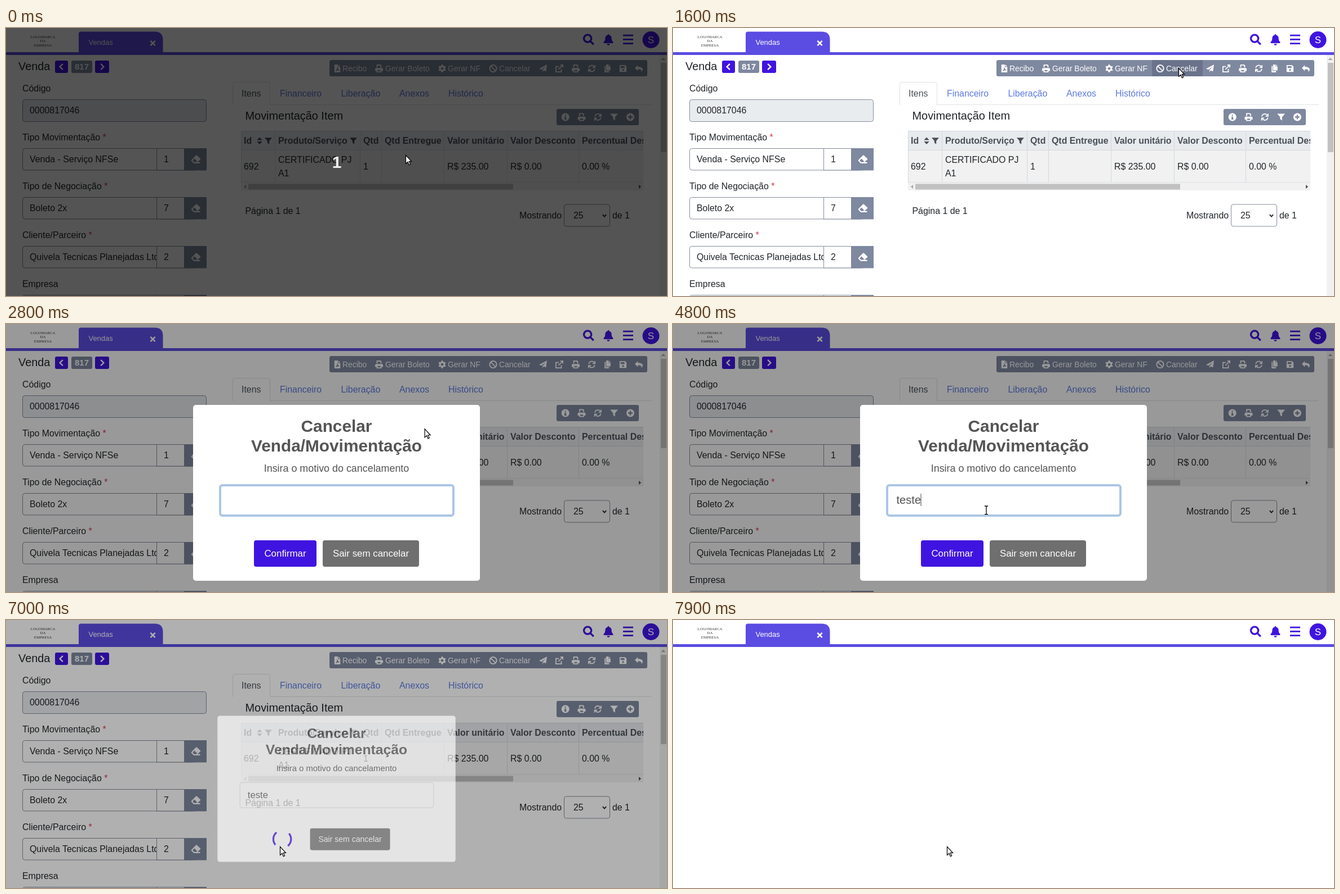
Write an HTML page that moves like this. It is 1173 by 477 pixels and loops after 8 s.

```html
<!DOCTYPE html>
<html lang="pt-BR">
<head>
<meta charset="utf-8">
<title>Vendas</title>
<style>
html, body { margin: 0; height: 100%; overflow: hidden; background: #fff; }
svg { display: block; }
text { font-family: "Liberation Sans", Arial, sans-serif; white-space: pre; }
</style>
</head>
<body>
<svg id="stage" width="1173" height="477" viewBox="0 0 1173 477"></svg>
<script>
const INK = '#212529', PURPLE = '#4014e0', VIOLET = '#5b4ce2', SLATE = '#7e889f', LINE = '#dee2e6';

const ring = 'M8 0a8 8 0 1 0 .01 0Z';
const gear = 'M' + Array.from({length: 24}, (_, i) => {
  const a = (i - .5) * Math.PI / 12, r = i % 4 < 2 ? 8 : 5.9;
  return (8 + r * Math.sin(a)).toFixed(2) + ' ' + (8 - r * Math.cos(a)).toFixed(2);
}).join('L') + 'ZM8 5.3a2.7 2.7 0 1 0 .01 0Z';

// Icons on a 16-unit grid: [path, stroke width (filled when absent)]
const ICONS = {
  print: ['M3 0H11L13 2V6H3ZM5 2V6H11V3H10V2ZM2 7H14Q16 7 16 9V13H13V16H3V13H0V9Q0 7 2 7ZM5 11V14H11V11Z'],
  pdf: ['M2 0H9V5H14V16H2ZM10 0L14 4H10ZM4.5 13Q8.5 9 7 6H8.2Q8.5 9 12 11.2L11.3 12.2Q8 10.7 5.6 13.6Z'],
  cog: [gear],
  ban: ['M8 1a7 7 0 1 0 .01 0M3 3L13 13', 2],
  plane: ['M16 0L14 14L9 12L7 16V11.5L13 4L5 10.5L0 8.5Z'],
  open: ['M12 9V15H1V4H7M10 1H15V6M15 1L6 10', 2],
  sync: ['M2 7A6 6 0 0 1 13 4.5M14 9A6 6 0 0 1 3 11.5M14.5 1V6H9.5M1.5 15V10H6.5', 2],
  copy: ['M5 0H10V4H14V12H5ZM11 0L14 3H11ZM2 3H4V13H11V16H2Z'],
  save: ['M1 1H12L15 4V15H1ZM3 3V7H11V3ZM8 9a2 2 0 1 0 .01 0Z'],
  reply: ['M0 7L6 1V4.5Q16 5 16 10Q16 13 13 15Q15 9.5 6 9.5V13Z'],
  info: [ring + 'M6.7 3H9.3V5.5H6.7ZM6 7H9.5V11.5H10.3V13H5.7V11.5H6.5V8.3H6Z'],
  plus: [ring + 'M6.7 3.5H9.3V6.7H12.5V9.3H9.3V12.5H6.7V9.3H3.5V6.7H6.7Z'],
  filter: ['M0 1H16L10 8V15L6 12V8Z'],
  sort: ['M3 7L8 1.5L13 7ZM3 9.5H13L8 15Z'],
  eraser: ['M9.5 1.5L15.5 7Q16 7.8 15.5 8.4L10.5 13H15V15H4.5L.5 11Q0 10 .5 9.3L8 1.7Q8.7 1 9.5 1.5ZM5.5 7L10 11.5L8.5 13H5L2.5 10.3Z'],
  times: ['M2 2L14 14M14 2L2 14', 4],
  search: ['M6.5 1.3a5.2 5.2 0 1 0 .01 0M10.5 10.5L15 15', 2.6],
  bell: ['M8 0Q9 0 9 1.3Q12.5 2 12.5 6Q12.5 9.5 14.5 11Q15.3 13 14 13H2Q.7 13 1.5 11Q3.5 9.5 3.5 6Q3.5 2 7 1.3Q7 0 8 0ZM6 14H10Q10 16 8 16Q6 16 6 14Z'],
  bars: ['M.8 2.4H15.2M.8 8.2H15.2M.8 14H15.2', 2.2],
  left: ['M10.5 2.5L5 8L10.5 13.5', 2.6],
  right: ['M5.5 2.5L11 8L5.5 13.5', 2.6],
  down: ['M3 5L8 10.5L13 5', 3],
};

const text = (x, y, s, size = 15.9, fill = INK, more = '') =>
  `<text x="${x}" y="${y}" font-size="${size}" fill="${fill}" ${more}>${s}</text>`;
const bold = (x, y, s, size, fill, more = '') => text(x, y, s, size, fill, 'font-weight="bold" ' + more);
const mid = 'text-anchor="middle"';
const rect = (x, y, x2, y2, fill, r = 0, more = '') =>
  `<rect x="${x}" y="${y}" width="${x2 - x}" height="${y2 - y}" rx="${r}" fill="${fill}" ${more}/>`;
const path = (d, fill, more = '') => `<path d="${d}" fill="${fill}" ${more}/>`;
const icon = (name, x, y, size = 14, color = '#fff') => {
  const [d, w] = ICONS[name], k = size / 16;
  const paint = w ? `stroke="${color}" stroke-width="${w}"` : 'fill-rule="evenodd"';
  return path(d, w ? 'none' : color, `${paint} transform="translate(${x - size / 2} ${y - size / 2}) scale(${k})"`);
};
const clip = (x, y, x2, y2, body) =>
  `<svg x="${x}" y="${y}" width="${x2 - x}" height="${y2 - y}" viewBox="${x} ${y} ${x2 - x} ${y2 - y}">${body}</svg>`;

const header = () =>
  ['LOGOMARCA', 'DA', 'EMPRESA'].map((s, i) =>
    text(65.5, 17.5 + i * 7.8, s, 6.8, '#333', mid + ' style="font-family:\'Liberation Serif\',serif"')).join('') +
  path('M129 44V10Q129 6.500 133 6.500H264Q278.500 6.500 278.500 21V44Z', VIOLET) +
  rect(0, 43, 1173, 48, VIOLET) +
  text(146.5, 30, 'Vendas', 12.95, '#fff') + icon('times', 260.5, 27, 11) +
  icon('search', 1034, 20.5, 20, PURPLE) + icon('bell', 1069, 20.8, 20, PURPLE) +
  icon('bars', 1104, 20, 20, PURPLE) +
  `<circle cx="1144.500" cy="21" r="15" fill="${PURPLE}"/>` + text(1144.5, 26.5, 'S', 17, '#fff', mid);

const border = 'stroke="#858d9c"';
const field = (y, label, value, code) =>
  text(29, y - 14, label + ' <tspan fill="#dc3545">*</tspan>') +
  rect(29.5, y + .5, 340, y + 39, '#fff', 4, border) +
  rect(267.5, y + .5, 330, y + 39, '#fff', 0, border) +
  path(`M316 ${y}H356V${y + 39.5}H316Z`, SLATE) +
  clip(30, y, 267, y + 39, text(42, y + 25, value)) +
  text(280, y + 25, code) + icon('eraser', 337, y + 19.5, 17);

const form = () =>
  text(22, 75, 'Venda', 19.9) +
  rect(87, 58, 110, 80, PURPLE, 3) + icon('left', 98.5, 69, 15) +
  rect(116, 58, 153, 80, SLATE, 3) + bold(134.5, 74, '817', 14.9, '#fff', mid) +
  rect(158, 58, 183, 80, PURPLE, 3) + icon('right', 170.5, 69, 15) +
  text(29, 113, 'Código') + rect(29.5, 127.5, 355.5, 166.5, '#e9ecef', 4, border) + text(42, 152, '0000817046') +
  field(214, 'Tipo Movimentação', 'Venda - Serviço NFSe', 1) +
  field(301, 'Tipo de Negociação', 'Boleto 2x', 7) +
  field(388, 'Cliente/Parceiro', 'Quivela Tecnicas Planejadas Ltda', 2) +
  field(475, '', '', '').replace(/<text.*?<\/text>/, '') + text(29, 461, 'Empresa');

const toolbar = () =>
  rect(574, 57, 1138, 86, SLATE, 3) + rect(850, 57, 940, 86, '#6a738b', 0, 'id="hover"') +
  [['pdf', 588, 'Recibo', 597], ['print', 662, 'Gerar Boleto', 673], ['cog', 774, 'Gerar NF', 784],
   ['ban', 864.5, 'Cancelar', 875], ['plane', 953], ['open', 982], ['print', 1011], ['sync', 1039.5],
   ['copy', 1067.5], ['save', 1095], ['reply', 1123]]
    .map(([n, x, s, tx]) => icon(n, x, 72) + (s ? text(tx, 77, s, 13.9, '#fff') : '')).join('') +
  rect(977, 144, 1123, 173, SLATE, 3) +
  ['info', 'print', 'sync', 'filter', 'plus'].map((n, i) => icon(n, 992.7 + i * 28.8, 158.5)).join('');

const table = () => clip(417, 183, 1131, 289,
  rect(417, 184, 1131, 218, '#e7ebee') + rect(417, 218, 1131, 275, '#f1f1f1') +
  path('M417 183.500H1131M417 217.500H1131M417 275H1131M417.500 184V275' +
    [478, 629, 667, 778, 890, 1017].map(x => `M${x - .5} 184V275`).join(''), 'none', 'stroke="#d3d8dd"') +
  [['Id', 422], ['Produto/Serviço', 483], ['Qtd', 634], ['Qtd Entregue', 672], ['Valor unitário', 783],
   ['Valor Desconto', 895], ['Percentual Desconto', 1022]]
    .map(([s, x]) => bold(x, 206, s, 15.9, '#495057')).join('') +
  icon('sort', 450, 200.5, 15, '#495057') + icon('filter', 465.5, 201, 13, '#495057') +
  icon('filter', 616.5, 201, 13, '#495057') +
  [['692', 422], ['1', 634], ['R$ 235.00', 783], ['R$ 0.00', 895], ['0.00 %', 1022]]
    .map(([s, x]) => text(x, 252, s)).join('') +
  text(483, 240, 'CERTIFICADO PJ') + text(483, 263.5, 'A1') +
  rect(417, 276, 1131, 289, '#f1f1f1') + rect(430, 277.5, 900, 287.5, '#c1c1c1') +
  path('M426 279V286L422 282.500Z', '#a3a3a3') + path('M1123 279V286L1127 282.500Z', '#505050'));

const panel = () =>
  path('M402 136.500H1146', 'none', `stroke="${LINE}"`) +
  path('M402.500 137V100Q402.500 96.500 406 96.500H465Q468.500 96.500 468.500 100V137', '#fff', `stroke="${LINE}"`) +
  text(418, 122, 'Itens', 15.9, '#495057') +
  [['Financeiro', 486], ['Liberação', 594.5], ['Anexos', 698], ['Histórico', 785]]
    .map(([s, x]) => text(x, 122, s, 15.9, '#5b7ae0')).join('') +
  text(424.5, 163, 'Movimentação Item', 19.9) +
  text(424.5, 331, 'Página 1 de 1') + text(911, 339, 'Mostrando') +
  rect(990.5, 314, 1071.5, 353, '#fff', 4, border) + text(1007, 339, '25') +
  icon('down', 1062, 334, 10) .replace('#fff', INK) + text(1076, 339, 'de 1') +
  rect(1160, 48, 1173, 477, '#f1f1f1') + rect(1162, 62, 1172, 221, '#c1c1c1') +
  path('M1162.500 57L1166.500 53L1170.500 57Z', '#a3a3a3');

const modal = () =>
  rect(332, 144, 841, 457, '#fff', 5) +
  bold(586.5, 191.5, 'Cancelar', 29.8, '#555', mid) +
  bold(586.5, 227, 'Venda/Movimentação', 29.8, '#555', mid) +
  text(586.5, 262.5, 'Insira o motivo do cancelamento', 17.9, '#545454', mid) +
  rect(380, 287, 794, 341, '#fff', 4, 'id="box"') +
  text(396.5, 320, '', 20.1, '#545454', 'id="typed"') +
  rect(0, 302, 1, 324, '#444', 0, 'id="caret"') +
  `<g id="confirm">${rect(440, 385, 551, 432, PURPLE, 4, 'id="confirmBg"')}${text(495.5, 414, 'Confirmar', 16.9, '#fff', mid)}</g>` +
  path('M-13.4 -13.4A19 19 0 0 0 -13.4 13.4M13.4 -13.4A19 19 0 0 1 13.4 13.4', 'none',
    `id="spinner" stroke="${PURPLE}" stroke-width="4"`) +
  `<g id="leave">${rect(562, 385, 733, 432, '#6f6f6f', 4)}${text(647.5, 414, 'Sair sem cancelar', 16.9, '#fff', mid)}</g>`;

document.getElementById('stage').innerHTML =
  rect(0, 0, 1173, 477, '#fff') + header() +
  `<g id="page">${form()}${toolbar()}${panel()}${table()}</g>` +
  rect(0, 0, 1173, 477, '#000', 0, 'id="shade"') +
  text(587, 249, '1', 30, '#f0f0f0', mid + ' id="count" font-weight="bold"') +
  `<g id="modal">${modal()}</g>` +
  `<g id="cursor">${path('M.5 .5V15.500L4 12.300L6.300 17.700L8.600 16.700L6.300 11.400H10.500Z', '#fff', 'id="arrow" stroke="#000" stroke-width="1.200"')}
   <g id="beam" fill="none">${['#fff" stroke-width="3', '#000" stroke-width="1.300'].map(s =>
     `<path d="M-3 -7H-1L0 -6L1 -7H3M0 -6V7M-3 8H-1L0 7L1 8H3" stroke="${s}"/>`).join('')}</g></g>`;

const el = {};
document.querySelectorAll('#stage [id]').forEach(e => el[e.id] = e);
const set = (e, attrs) => { for (const k in attrs) e.setAttribute(k, attrs[k]); };
const show = (e, on) => set(e, {visibility: on ? 'inherit' : 'hidden'});

// Linear interpolation through [time, ...values]
function track(keys, t) {
  const i = keys.findIndex(k => k[0] > t);
  if (i < 0) return keys[keys.length - 1].slice(1);
  if (!i) return keys[0].slice(1);
  const a = keys[i - 1], b = keys[i], p = (t - a[0]) / (b[0] - a[0]);
  return a.slice(1).map((v, j) => v + (b[j + 1] - v) * p);
}

const MOVES = [[500, 709, 226], [700, 727, 202], [800, 727, 202], [1600, 897, 71], [2300, 897, 71],
  [2800, 743, 186], [3200, 582, 318], [3300, 582, 318], [3600, 556, 331], [6100, 556, 331], [6700, 486, 403]];
const OPEN = 1770, CLOSE = 6950, LOAD = 6800;
const SCALE = [[OPEN, .7], [OPEN + 135, 1.05], [OPEN + 240, .95], [OPEN + 300, 1], [CLOSE, 1], [CLOSE + 150, .5]];
const CARET = [[1850, 2400], [2900, 3400], [3600, 5400], [6000, 6500]];

function draw(t) {
  const counting = t < 500, opened = t >= OPEN && t < CLOSE + 150, loading = t >= LOAD;
  const gone = Math.max(0, (t - CLOSE) / 150);
  show(el.page, t < 7900);
  show(el.count, counting);
  show(el.hover, t >= 1400 && t < OPEN);
  const dim = counting ? .67 : opened ? .4 * Math.min(1, (t - OPEN) / 100) * (1 - gone ** 1.4) : 0;
  set(el.shade, {opacity: dim});

  show(el.modal, opened);
  const [k] = track(SCALE, t);
  set(el.modal, {
    transform: `translate(586.5 300.5) scale(${k}) translate(-586.5 -300.5)`,
    opacity: t < CLOSE ? Math.min(1, (t - OPEN) / 60) : Math.max(0, 1 - gone),
  });
  set(el.box, loading ? {stroke: '#d0d4d8', 'stroke-width': 1} : {stroke: '#abc6e5', 'stroke-width': 4});
  const n = t < 4100 ? 0 : t < 4500 ? 1 : t < 4800 ? 3 : 5;
  el.typed.textContent = 'teste'.slice(0, n);
  set(el.caret, {x: n ? 396.2 + [0, 5.6, 0, 26.8, 0, 43.3][n] : 396.2});
  show(el.caret, CARET.some(([a, b]) => t >= a && t < b));
  show(el.confirm, !loading);
  set(el.confirmBg, {fill: t >= 6600 ? '#3a12ca' : PURPLE});
  show(el.spinner, loading);
  set(el.spinner, {transform: `translate(470.4 408.4) rotate(${(t - 6980) * .24})`});
  set(el.leave, {transform: `translate(${loading ? -32 : 0} 0)`});

  const [x, y] = track(MOVES, t);
  const inField = t > 3000 && x > 380 && y > 287 && y < 341;
  set(el.cursor, {transform: `translate(${x} ${y})`});
  show(el.arrow, !inField);
  show(el.beam, inField);
}

const start = performance.now();
function frame() {
  draw((performance.now() - start) % 8000);
  requestAnimationFrame(frame);
}
frame();
</script>
</body>
</html>
```
